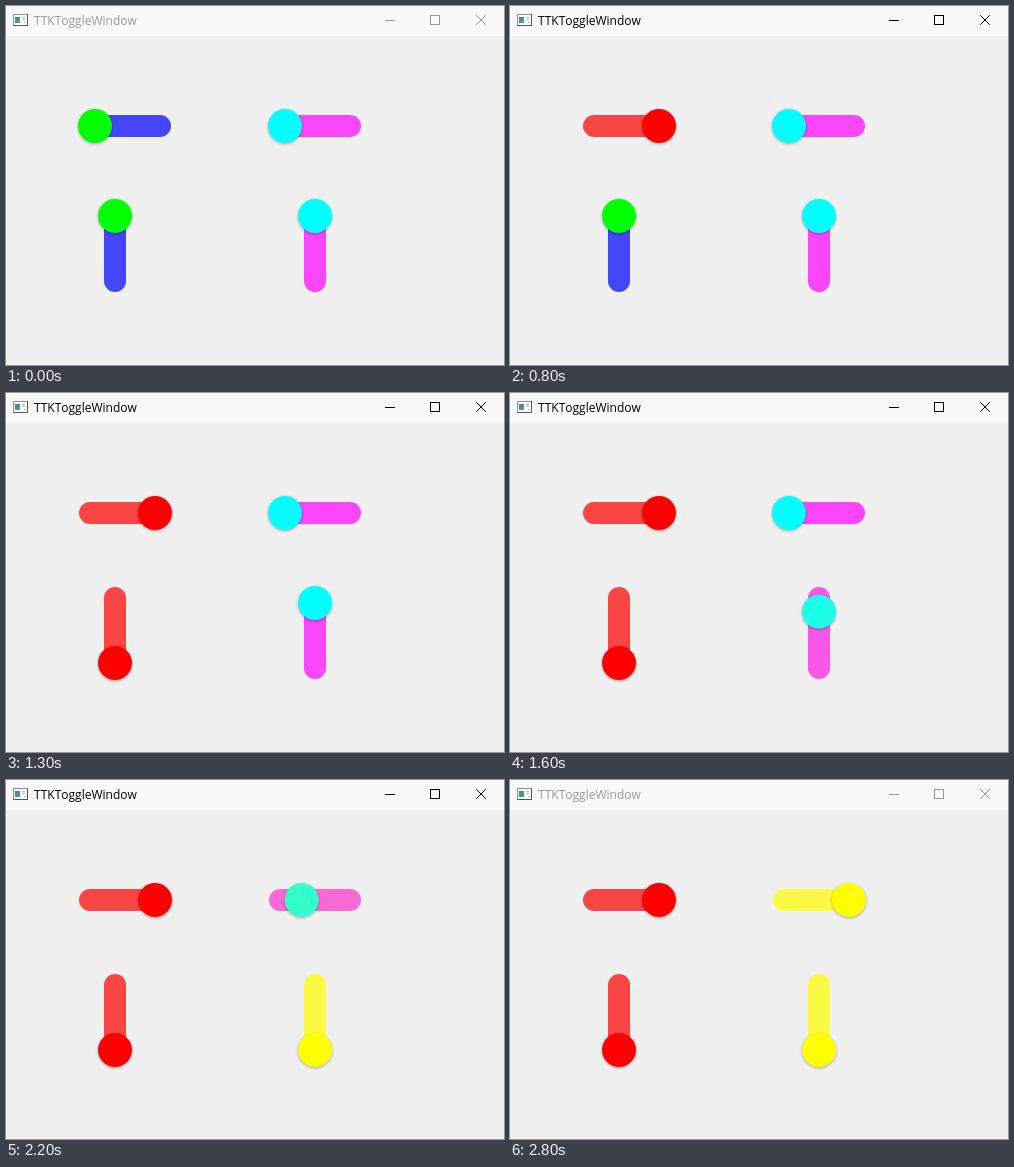
These frames come from a looping animation (498x359 px, 3.4 s). An HTML page:

```html
<!DOCTYPE html>
<html lang="en">
<head>
<meta charset="utf-8">
<title>TTKToggleWindow</title>
<style>
  html, body { margin: 0; width: 100%; height: 100%; overflow: hidden; background: #f0f0f0; }
  svg { display: block; }

  .chrome { animation: focus 3400ms step-end infinite; }
  .title { font: 12px "Open Sans", "Noto Sans", sans-serif; font-kerning: none; fill: currentColor; }
  .buttons { fill: none; stroke: currentColor; }

  .toggle { --shift: 0px; --mix: 0%; animation: 3400ms step-end infinite; }
  .track { fill: color-mix(in srgb, var(--track-on) var(--mix), var(--track-off)); fill-opacity: .71; }
  .thumb {
    fill: color-mix(in srgb, var(--thumb-on) var(--mix), var(--thumb-off));
    filter: drop-shadow(0 1px 1.5px rgba(0, 0, 0, .31));
  }
  .across .thumb { transform: translate(var(--shift), 0); }
  .down .thumb { transform: translate(0, var(--shift)); }

  .vivid { --track-off: #00f; --track-on: #f00; --thumb-off: #0f0; --thumb-on: #f00; }
  .neon { --track-off: #f0f; --track-on: #ff0; --thumb-off: #0ff; --thumb-on: #ff0; }

  .vivid.across { animation-name: first; }
  .vivid.down { animation-name: second; }
  .neon.down { animation-name: third; }
  .neon.across { animation-name: fourth; }

  /* Thumb eases out over 200ms, colour runs linearly over 150ms, both sampled every 100ms. */
  @keyframes first {
    0% { --shift: 0px; --mix: 0%; }
    17.64% { --shift: 8.66px; --mix: 10%; }
    20.58% { --shift: 49.16px; --mix: 76.7%; }
    23.52%, 100% { --shift: 60px; --mix: 100%; }
  }
  @keyframes second {
    0% { --shift: 0px; --mix: 0%; }
    32.35% { --shift: 26.25px; --mix: 33.3%; }
    35.29% { --shift: 56.25px; --mix: 100%; }
    38.23%, 100% { --shift: 60px; --mix: 100%; }
  }
  @keyframes third {
    0% { --shift: 0px; --mix: 0%; }
    47.05% { --shift: 8.66px; --mix: 10%; }
    49.99% { --shift: 49.16px; --mix: 76.7%; }
    52.94%, 100% { --shift: 60px; --mix: 100%; }
  }
  @keyframes fourth {
    0% { --shift: 0px; --mix: 0%; }
    64.7% { --shift: 16.65px; --mix: 20%; }
    67.64% { --shift: 52.65px; --mix: 86.7%; }
    70.58%, 100% { --shift: 60px; --mix: 100%; }
  }
  @keyframes focus {
    0%, 82.35%, 100% { color: #999; }
    17.64% { color: #000; }
  }
</style>
</head>
<body>
<svg width="498" height="359" viewBox="0 0 498 359">
  <defs>
    <linearGradient id="pane" x2="1" y2="1">
      <stop stop-color="#3f7f96"/>
      <stop offset="1" stop-color="#5fa08c"/>
    </linearGradient>
  </defs>

  <rect width="498" height="30" fill="#f9f9f9"/>
  <g shape-rendering="crispEdges">
    <rect x="7" y="8" width="15" height="12" fill="#55595c"/>
    <rect x="7" y="8" width="14" height="11" fill="#8d9499"/>
    <rect x="8" y="9" width="13" height="10" fill="#fff"/>
    <rect x="9" y="11" width="5" height="6" fill="url(#pane)"/>
    <path d="M16 11.5h3M16 13.5h3M18 16.5h2" stroke="#b9bec2"/>
  </g>

  <g class="chrome">
    <text class="title" x="28" y="19">TTKToggleWindow</text>
    <g class="buttons">
      <path d="M379 14.5h10"/>
      <rect x="424.5" y="9.5" width="9" height="9"/>
      <path d="M470.2 9.2l9.6 9.6M479.8 9.2l-9.6 9.6"/>
    </g>
  </g>

  <g class="toggle across vivid">
    <rect class="track" x="73" y="109" width="92" height="22" rx="11"/>
    <circle class="thumb" cx="89" cy="120" r="17"/>
  </g>
  <g class="toggle across neon">
    <rect class="track" x="263" y="109" width="92" height="22" rx="11"/>
    <circle class="thumb" cx="279" cy="120" r="17"/>
  </g>
  <g class="toggle down vivid">
    <rect class="track" x="98" y="194" width="22" height="92" rx="11"/>
    <circle class="thumb" cx="109" cy="210" r="17"/>
  </g>
  <g class="toggle down neon">
    <rect class="track" x="298" y="194" width="22" height="92" rx="11"/>
    <circle class="thumb" cx="309" cy="210" r="17"/>
  </g>
</svg>
</body>
</html>
```
